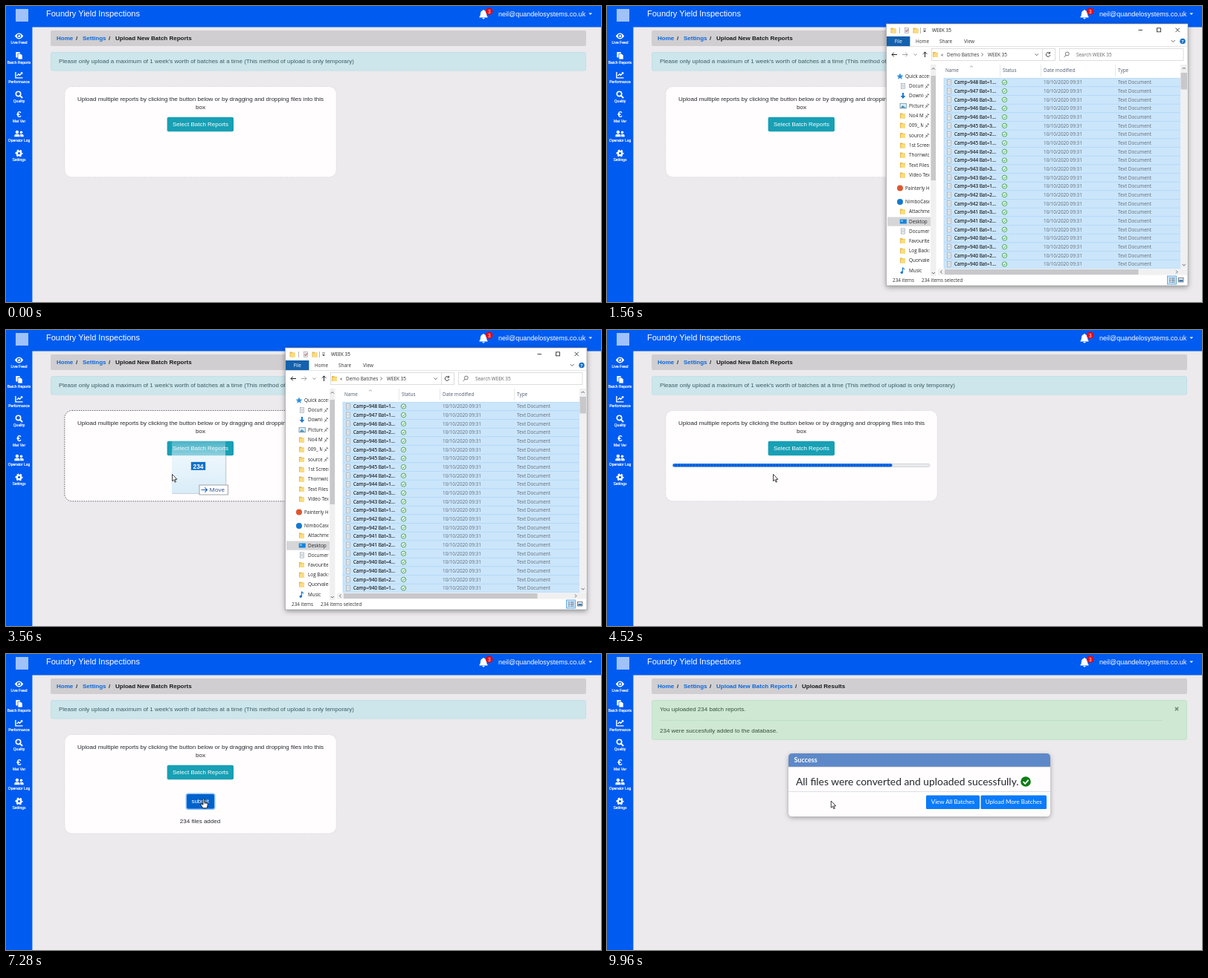
Write an HTML page that moves like this. It is 800x399 px and loops after 10000 ms.

```html
<!DOCTYPE html>
<html lang="en">
<head>
<meta charset="utf-8">
<title>Batch upload</title>
<style>
html, body { margin: 0; width: 100%; height: 100%; overflow: hidden; background: #eceaed; }
svg { display: block; width: 100vw; height: 100vh; font-family: "Liberation Sans", Arial, sans-serif; }
text { white-space: pre; }
.win { font-family: "Open Sans", "Noto Sans", sans-serif; }
.lato { font-family: Lato, sans-serif; }
.serif { font-family: "Liberation Serif", serif; }
</style>
</head>
<body>
<svg id="stage" viewBox="0 0 800 399" xmlns="http://www.w3.org/2000/svg"></svg>
<script>
const LOOP = 10000;
const BLUE = '#005bf0', INK = '#24282c', LINK = '#0b66dc';

const text = (x, y, s, size = 8, fill = INK, extra = '') =>
  `<text x="${x}" y="${y}" font-size="${size}" fill="${fill}" ${extra}>${s}</text>`;
const rect = (x, y, w, h, fill, extra = '') =>
  `<rect x="${x}" y="${y}" width="${w}" height="${h}" fill="${fill}" ${extra}/>`;
const line = (d, stroke, w = 1, extra = '') =>
  `<path d="${d}" fill="none" stroke="${stroke}" stroke-width="${w}" ${extra}/>`;
const shape = (d, fill, extra = '') => `<path d="${d}" fill="${fill}" ${extra}/>`;
const dot = (x, y, r, fill, extra = '') => `<circle cx="${x}" cy="${y}" r="${r}" fill="${fill}" ${extra}/>`;
const group = (id, body, extra = '') => `<g id="${id}" ${extra}>${body}</g>`;
const at = (x, y, body) => `<g transform="translate(${x} ${y})">${body}</g>`;
const MID = 'text-anchor="middle" ', BOLD = 'font-weight="700"';

// Side menu
const icons = [
  shape('M-5.7 0Q0-8 5.7 0Q0 8-5.7 0Z', '#fff') + dot(0, 0, 2.7, BLUE) + dot(0, 0, 1.7, '#fff') + dot(-.7, -.7, .7, BLUE),
  rect(-4.2, -4.8, 5.5, 7.5, '#fff', 'rx=".6"') + shape('M-1.6-2.6H2.2L4.6-.2V5.2H-1.6Z', '#fff', `stroke="${BLUE}" stroke-width=".7"`),
  line('M-4.6-4V3.8H5', '#fff', 1.4) + line('M-2.8 1L-.6-1.4L1 .2L3.8-2.8', '#fff', 1.4) + shape('M1.8-3.8H4.8V-.8Z', '#fff'),
  `<circle cx="-1" cy="-1" r="3.2" fill="none" stroke="#fff" stroke-width="1.7"/>` + line('M1.4 1.4L4.6 4.6', '#fff', 2),
  text(0, 4, '€', 11.5, '#fff', MID + BOLD),
  dot(-2.6, -2.2, 2.2, '#fff') + dot(3, -1.9, 1.8, '#fff') +
    shape('M-6.2 4.2V2.6Q-6 .6-4 .6H-1.2Q.8 .6 1 2.6V4.2Z', '#fff') + shape('M1.8 4.2V2.4L1.2 .6H4Q6 .8 6.2 2.6V4.2Z', '#fff'),
  `<circle r="2.7" fill="none" stroke="#fff" stroke-width="2.2"/>` +
    `<circle r="4.1" fill="none" stroke="#fff" stroke-width="1.8" stroke-dasharray="2.4 1.893" stroke-dashoffset="1.2"/>`
];
const labels = ['Live Feed', 'Batch Reports', 'Performance', 'Quality', 'Mat Var', 'Operator Log', 'Settings'];
const menu = (first, step) =>
  labels.map((s, i) => text(17.5, first + i * step, s, 5, '#fff', MID + 'stroke="#fff" stroke-width=".2"')).join('');

const bell = at(642, 11, shape('M0-6Q1-6 1-4.9Q4-4.1 4-1Q4 2 5.5 3.4V4.4H-5.5V3.4Q-4 2-4-1Q-4-4.1-1-4.9Q-1-6 0-6Z', '#fff') +
  shape('M-1.6 5H1.6Q1.4 6.6 0 6.6Q-1.4 6.6-1.6 5Z', '#fff'));

const chrome =
  rect(0, 0, 800, 28.5, BLUE) + rect(0, 28, 35.4, 371, BLUE) +
  rect(13, 4, 17, 17, '#9fc2fb') +
  text(54, 14.3, 'Foundry Yield Inspections', 11, '#fff') +
  text(662, 14.2, 'neil@quandelosystems.co.uk', 9, '#fff') +
  shape('M783.5 9.5H788.1L785.8 12Z', '#fff') +
  group('ready', icons.map((s, i) => at(17.5, 40.4 + i * 26.35, s)).join('') + menu(51.2, 26.35) + bell) +
  group('bare', menu(55, 30.15)) +
  group('badge', dot(0, 0, 4.8, '#e00d17') + text(0, 2.3, '3', 6.5, '#fff', MID));

const crumbs = last => {
  const items = [[68, 'Home'], [103, 'Settings'], [147, 'Upload New Batch Reports'], [262, 'Upload Results']].slice(0, last);
  return rect(60, 33, 720, 21, '#d0ced0', 'rx="2"') +
    items.map(([x, s], i) => text(x, 46, s, 8, i === last - 1 ? '#151719' : LINK, BOLD)).join('') +
    [94, 138, 253].slice(0, last - 1).map(x => text(x, 46, '/', 8, INK, BOLD)).join('');
};

// Upload form
const upload = crumbs(3) +
  rect(60.5, 62.5, 719, 24.5, '#cce6eb', 'rx="2" stroke="#bfe0e6"') +
  text(71, 77, "Please only upload a maximum of 1 week's worth of batches at a time (This method of upload is only temporary)", 8, '#3d5b62') +
  `<rect id="drop" x="78.8" y="108.5" width="365.4" rx="10" fill="#fffdfe" stroke-width=".8" stroke-dasharray="1.6 1.4"/>` +
  text(261.5, 127.5, 'Upload multiple reports by clicking the button below or by dragging and dropping files into this', 8, INK, MID) +
  text(261.5, 139, 'box', 8, INK, MID) +
  rect(216.6, 149.8, 89.4, 19.4, '#18a0b5', 'rx="2"') + text(261.5, 162.2, 'Select Batch Reports', 8, '#fff', MID) +
  group('progress', rect(88.4, 180.4, 345.6, 4, '#e9ecef', 'rx="2" stroke="#c9c9cd" stroke-width=".8"') +
    `<rect id="bar" x="88.4" y="180.2" height="4.2" rx="2" fill="#0a6ff0"/>` +
    `<path id="stripes" fill="none" stroke="#0058cf" stroke-width="3.4" stroke-dasharray="2 2"/>`) +
  group('added', `<rect id="ring" x="241.5" y="187.5" width="40" height="22.5" rx="3.5" fill="#8fc0fb"/>` +
    `<rect id="submit" x="243" y="189" width="37" height="19.5" rx="2"/>` +
    text(261.2, 201.2, 'submit', 8, '#fff', MID) + text(261, 228, '234 files added', 8, INK, MID));

// Result page
const dialog = (cls, size, buttons) => group(cls,
  text(251.5, 146.3, 'Success', 9, '#fff', BOLD) +
  text(254, 176.6, 'All files were converted and uploaded sucessfully.', size, INK) +
  buttons.map(([x, w, s]) => rect(x, 190.5, w, 18.5, '#0a7bfa', 'rx="1.5"') +
    text(x + w / 2, 202.3, s, 8, '#fff', MID)).join(''), `class="${cls}"`);

const result = crumbs(4) +
  rect(60.5, 62.5, 719, 53, '#cee8d4', 'rx="2" stroke="#c0e2c9"') +
  text(71, 77, 'You uploaded 234 batch reports.', 8, '#33523c') +
  line('M71 89.5H747', '#b9dcc1', .8) +
  text(71, 105.5, '234 were succesfully added to the database.', 8, '#33523c') +
  line('M763.8 71.8L768.2 76.2M768.2 71.8L763.8 76.2', '#6f8576', 1.5) +
  rect(244, 134, 352, 85, '#fffdfe', 'rx="5" filter="url(#soft)"') +
  shape('M244 152V139Q244 134 249 134H591Q596 134 596 139V152Z', '#5d89c9') +
  line('M244 152.4H596M244 185.5H596', '#dcdce2', .9) +
  dialog('serif', 14, [[437, 69, 'View All Batches'], [508, 83, 'Upload More Batches']]) +
  dialog('lato', 13.84, [[429, 72, 'View All Batches'], [502.5, 88.5, 'Upload More Batches']]) +
  group('tick', dot(563, 172, 6.8, '#0a7d12') + line('M559.6 172.2L562.2 174.8L566.6 169.8', '#fff', 1.9));

// File window
const folder = (x, y) => at(x, y, shape('M-3.5-3.5H-.5L.5-2.5H3.5V3.5H-3.5Z', '#e9b949') + rect(-2.6, -1.8, 6.2, 5.3, '#fbdc7f'));
const sheet = (x, y) => rect(x - 2.6, y - 3.6, 5.2, 7.2, '#f7f9fb', 'stroke="#8b979f" stroke-width=".6"') +
  line(`M${x - 1.5} ${y - 1.5}h3m-3 1.5h3m-3 1.5h3`, '#9aa7af', .6);
const small = (x, y, s, fill = '#333', extra = '') => text(x, y, s, 6.4, fill, extra);

const places = [
  [95, 'Quick access', 'star'], [108, 'Documents', 'doc'], [121, 'Downloads', 'down'], [134.5, 'Pictures', 'pic'],
  [148, 'No4 Mix'], [161, '009_ Mix'], [174.5, 'source'], [188, '1st Screen'], [201, 'Thornwic'], [214.5, 'Text Files'],
  [228, 'Video Text'], [245.5, 'Painterly Hub', 'red'], [264, 'NimboCase -', 'blue'], [277, 'Attachments'],
  [290.5, 'Desktop', 'desk'], [303.5, 'Documents', 'doc'], [316.5, 'Favourites'], [330, 'Log Backs'],
  [343, 'Quorvalen'], [356.5, 'Music', 'note']
];
const marks = {
  star: y => shape(`M394 ${y - 4.5}l1.3 3 3.2.2-2.5 2 .9 3.1-2.9-1.7-2.9 1.7.9-3.1-2.5-2 3.2-.2Z`, '#2d8fe0'),
  doc: y => sheet(398, y),
  down: y => line(`M398 ${y - 4}v6`, '#1d78c9', 2) + shape(`M394.6 ${y}h6.8l-3.4 4Z`, '#1d78c9'),
  pic: y => rect(394, y - 3, 8.4, 6.4, '#d9eefb', 'stroke="#6b8796" stroke-width=".7"') + shape(`M394.5 ${y + 3}l3-3.5 4.5 3.5Z`, '#4a90b8'),
  red: y => dot(394, y, 4, '#e0562f'),
  blue: y => dot(394, y, 4, '#1479d0'),
  desk: y => rect(393.8, y - 3, 9, 6, '#1684dc') + rect(395, y - 1.8, 3, 2, '#7cc4f7'),
  note: y => line(`M397.5 ${y + 3}v-7q1 2 3 2.5`, '#1d78c9', 1.2) + dot(396.3, y + 2.8, 1.7, '#1d78c9')
};
const nav = places.map(([y, s, kind], i) => {
  const root = ['star', 'red', 'blue'].includes(kind), pinned = i > 0 && i < 7;
  return (kind ? marks[kind](y) : folder(397.5, y)) +
    small(root ? 401 : 406, y + 2.4, s, '#222', `clip-path="url(#${pinned ? 'short' : 'pane'})"`) +
    (pinned ? line(`M431 ${y - 3}l2.2 2.2m-1.2-1l-2.3 2.4m-1.1-1.1l2.6 2.6m-1.3-1.3l-2.2 2.2`, '#555', .9) : '');
}).join('');

const names = [1, 1, 3, 3, 2, 3, 2, 3, 4].flatMap((n, i) =>
  Array.from({ length: n }, (_, k) => `Camp=${948 - i} Bat=${n - k}...`));
const PITCH = 11.667;
const rows = names.map((s, i) => {
  const y = 103 + i * PITCH;
  return rect(453, y - 5.8, 320, PITCH, '#cbe5fa', 'stroke="#a8d5f7" stroke-width=".6"') + sheet(460, y) +
    small(467, y + 2.3, s, '#111', 'stroke="#111" stroke-width=".12"') +
    dot(534.5, y, 3.2, '#e9f7ec', 'stroke="#35a04d" stroke-width=".9"') + line(`M533 ${y}l1.2 1.2 2-2.3`, '#2f9446', .8) +
    small(587, y + 2.3, '10/10/2020 09:31', '#5f6b75') + small(687, y + 2.3, 'Text Document', '#5f6b75');
}).join('');

const explorer =
  rect(375.6, 24, 405.4, 353, '#fff', 'filter="url(#deep)"') +
  rect(375.6, 24, 405.4, 353, '#fff', 'stroke="#9a9a9e" stroke-width=".7"') +
  folder(385, 33) + line('M393.5 29V37M421.5 29V37', '#999', .7) + sheet(403, 33) +
  line('M401.5 33l1.3 1.5 2.4-3', '#c33', .9) + folder(415, 33) +
  line('M425 31h4', '#444', .8) + shape('M425 33h4l-2 2.2Z', '#444') +
  small(437, 35.3, 'WEEK 35', '#222') +
  line('M714.5 32.5h5.5M764.5 29.7l5.4 5.4m0-5.4l-5.4 5.4', '#333', .9) + rect(739.5, 29.8, 5, 5, 'none', 'stroke="#333" stroke-width=".9"') +
  rect(376, 41, 31.4, 13.5, '#1461ad') + small(391.8, 50, 'File', '#fff', MID) +
  small(415, 50, 'Home') + small(447, 50, 'Share') + small(480, 50, 'View') +
  line('M758.7 46l2.5 2.5 2.5-2.5', '#555', .9) + dot(774, 47.5, 3.8, '#1d74c4') + text(774, 49.8, '?', 6, '#fff', MID + BOLD) +
  line('M376 54.5H781', '#dcdddf', .8) +
  line('M390 65.5h-7m2.8-2.8l-2.8 2.8 2.8 2.8', '#222', 1) + line('M397 65.5h7m-2.8-2.8l2.8 2.8-2.8 2.8', '#999', .9) +
  line('M412.5 64.5l2 2 2-2', '#777', .8) + line('M427.5 69v-7m-2.8 2.8l2.8-2.8 2.8 2.8', '#222', 1) +
  rect(436.5, 57.5, 166, 16, '#fff', 'stroke="#d5d5d8" stroke-width=".8"') + folder(441.5, 65.5) +
  small(449, 67.7, '«') + small(457, 67.7, 'Demo Batches') + line('M503.5 63.5l2 2-2 2', '#444', .8) + small(512, 67.7, 'WEEK 35') +
  line('M575.5 64.5l2.2 2.2 2.2-2.2', '#444', .8) + line('M585.5 58V73.5', '#d5d5d8', .8) +
  line('M595.3 63.8a2.8 2.8 0 1 0 .5 2.2m-.3-4.2v2.2h-2.2', '#333', .9) +
  rect(608.5, 57.5, 166.5, 16, '#fff', 'stroke="#d5d5d8" stroke-width=".8"') +
  `<circle cx="618.8" cy="64.5" r="2.4" fill="none" stroke="#555" stroke-width=".8"/>` + line('M617 66.5l-2.4 2.4', '#555', .9) +
  small(631, 67.7, 'Search WEEK 35', '#666') +
  rect(377, 284.5, 58, 12.2, '#d6d6d8') + nav +
  rect(435, 79, 7.5, 285, '#f0f0f1') + rect(435.5, 94, 6.5, 141, '#c8c8ca') +
  line('M436.8 85.5l2-2 2 2M436.8 359l2 2 2-2', '#555', .9) +
  small(455, 89.3, 'Name', '#4c5a6b') + small(532, 89.3, 'Status', '#4c5a6b') + small(587, 89.3, 'Date modified', '#4c5a6b') + small(687, 89.3, 'Type', '#4c5a6b') +
  line('M488 82.5l2-1.8 2 1.8', '#888', .7) + line('M528.5 79V95M583.5 79V95M683.5 79V95', '#e0e3e6', .8) +
  rows +
  rect(771, 79, 9.5, 275, '#f0f0f1') + rect(771.5, 90, 8.5, 22.5, '#c8c8ca') +
  line('M773.6 85l2.1-2.1 2.1 2.1M773.6 348l2.1 2.1 2.1-2.1', '#555', .9) +
  rect(445, 354.5, 335, 8, '#f0f0f1') + rect(454, 355, 260.5, 7, '#c8c8ca') +
  line('M450.5 356.5l-2 2 2 2M765 356.5l2 2-2 2', '#555', .9) +
  small(384, 372.2, '234 items') + small(423, 372.2, '234 items selected') +
  rect(753.5, 364, 12, 11, '#cbe5fa', 'stroke="#4a9fe0" stroke-width=".8"') +
  line('M756 367h2m1 0h4.5M756 369.5h2m1 0h4.5M756 372h2m1 0h4.5', '#444', .8) +
  rect(768.5, 366.5, 6.5, 5.5, '#e4eef7', 'stroke="#555" stroke-width=".7"') + rect(769.3, 369, 5, 2.5, '#3f7fb5');

// Dragged bundle, placed relative to the pointer tip
const ghost =
  line('M0 25.8H72V-25', '#8f9aa2', 1.6, 'opacity=".45"') +
  rect(-.5, -44.5, 72, 70, 'url(#veil)') +
  rect(25, -16.8, 20, 11.4, '#1170c6', 'stroke="#fff" stroke-width=".5"') + text(35, -8, '234', 8.4, '#fff', MID + BOLD) +
  group('tip', rect(36.5, 14.5, 38.5, 13, '#fff', 'stroke="#8d8d92" stroke-width=".8"') +
    line('M39 21h8m-3.2-3.2l3.2 3.2-3.2 3.2', '#2460b5', 1.1) + text(50, 23.8, 'Move', 8, '#264a8c'), 'class="win"');

const arrow = shape('M0 0V9.2L2.1 7.3L3.6 10.7L5 10.1L3.5 6.8H6.4Z', '#fff', 'stroke="#111" stroke-width=".8" stroke-linejoin="round"');
const hand = shape('M-1 .8Q0-.6 1 .8V5L5.4 6V9Q5 12 3.8 13H-1Q-2.5 10.8-4 8.3Q-4.2 6.8-2.6 7.2L-1 8.6Z', '#fff', 'stroke="#111" stroke-width=".9" stroke-linejoin="round"') +
  line('M1 5V7.2M2.6 5.5V7.4M4 5.8V7.5', '#111', .6);

const shadow = (id, dev, dy, alpha) => `<filter id="${id}" x="-20%" y="-20%" width="140%" height="140%">
  <feDropShadow dx="0" dy="${dy}" stdDeviation="${dev}" flood-color="#000" flood-opacity="${alpha}"/></filter>`;

document.getElementById('stage').innerHTML =
  `<defs>${shadow('soft', 3, 2, .32)}${shadow('deep', 3.5, 2, .4)}
    <clipPath id="pane"><rect x="376" y="79" width="57.5" height="285"/></clipPath>
    <clipPath id="short"><rect x="376" y="79" width="49.5" height="285"/></clipPath>
    <linearGradient id="veil" x1="0" y1="0" x2="0" y2="1">
      <stop offset="0" stop-color="#e0f1fb" stop-opacity=".25"/><stop offset=".4" stop-color="#e2f2fb" stop-opacity=".75"/>
      <stop offset="1" stop-color="#d6ebf8" stop-opacity=".95"/></linearGradient></defs>` +
  rect(0, 0, 800, 399, '#eceaed') + chrome + group('upload', upload) + group('result', result) +
  group('explorer', explorer, 'class="win"') + group('ghost', ghost) +
  group('pointer', group('arrow', arrow) + group('hand', hand));

const $ = id => document.getElementById(id);
const show = (id, on) => $(id).setAttribute('display', on ? 'inline' : 'none');
const set = (id, attrs) => { for (const k in attrs) $(id).setAttribute(k, attrs[k]); };

// Pointer stops: time, x, y
const path = [
  [1600, 610, 300], [2040, 500, 206], [2480, 494, 205], [3440, 223.5, 194.5], [4640, 223.5, 194.5],
  [4880, 246, 198], [5120, 246, 198], [5400, 265.8, 194.8], [8480, 265.8, 194.8], [8880, 301.3, 198]
];
function pointerAt(t) {
  if (t <= path[0][0]) return path[0].slice(1);
  const i = path.findIndex(p => p[0] > t);
  if (i < 0) return path[path.length - 1].slice(1);
  const [t0, x0, y0] = path[i - 1], [t1, x1, y1] = path[i];
  const u = (t - t0) / (t1 - t0), e = u * u * (3 - 2 * u);
  return [x0 + (x1 - x0) * e, y0 + (y1 - y0) * e];
}

function draw(t) {
  const [x, y] = pointerAt(t);
  const done = t >= 8000, ready = !done || t >= 8240;
  const dragging = t >= 2160 && t < 3600;
  const added = t >= 4580, loading = t >= 3700 && !added;
  const over = dragging && x < 376, clicked = t >= 5600;
  const place = { transform: `translate(${x.toFixed(2)} ${y.toFixed(2)})` };

  show('ready', ready); show('bare', !ready);
  set('badge', { transform: `translate(649.7 ${ready ? 7.2 : 8.6})` });
  show('upload', !done); show('result', done);
  show('serif', !ready); show('lato', ready); show('tick', ready);

  set('drop', { height: added ? 133.5 : 122.3, stroke: over ? '#4a4a4c' : '#d3d1d6' });
  show('progress', loading);
  const w = 345.6 * Math.max(0, Math.min(1, .853 * (t - 3760) / 760));
  set('bar', { width: w });
  set('stripes', { d: `M89.4 182.3H${88.4 + Math.max(1, w - 1)}`, 'stroke-dashoffset': -(t / 50 % 4) });
  show('stripes', w > 4);
  show('added', added); show('ring', clicked);
  set('submit', { fill: clicked ? '#0062cc' : x >= 243 ? '#0069d9' : '#007bff' });

  show('explorer', t >= 1480 && t < 3640);
  show('ghost', dragging); show('tip', x < 376);
  set('ghost', place);
  const point = t >= 6240 && t < 8480;
  show('pointer', t >= 1600); show('hand', point); show('arrow', !point);
  set('pointer', place);
}

const start = performance.now();
function tick() {
  draw((performance.now() - start) % LOOP);
  requestAnimationFrame(tick);
}
draw(0);
requestAnimationFrame(tick);
</script>
</body>
</html>
```
